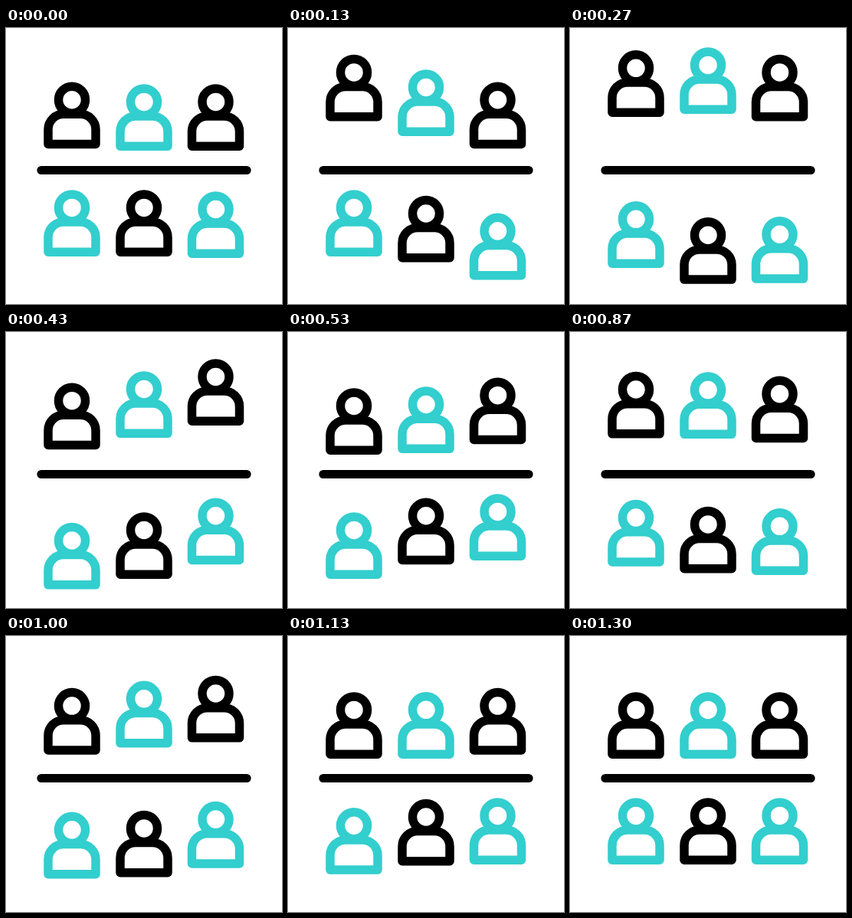
These frames come from a looping animation (360 px wide and 360 px high, 1.67 s). An HTML page:

```html
<!DOCTYPE html>
<html lang="en">
<head>
<meta charset="utf-8">
<title>Jumping groups</title>
<style>
  html, body { margin: 0; width: 100%; height: 100%; overflow: hidden; background: #fff; }
  svg { display: block; width: 100%; height: 100%; }
</style>
</head>
<body>
<svg id="stage" viewBox="0 0 360 360">
  <defs>
    <g id="person" fill="none" stroke-width="11.5" stroke-linecap="round" stroke-linejoin="round">
      <circle cy="23.4" r="17.5"/>
      <path d="M-31 81.2V62a20 20 0 0 1 20-20H11a20 20 0 0 1 20 20V81.2Z"/>
    </g>
  </defs>
  <path d="M46 185.5H314" stroke="#000" stroke-width="11.2" stroke-linecap="round"/>
</svg>
<script>
  const LOOP = 1670, FPS = 30;
  const BLACK = '#000', TEAL = '#33cece';
  const COLUMNS = [86, 180, 273.5];
  const stage = document.getElementById('stage');

  // dir: jump direction; lag: delay between neighbours, in ticks
  const rows = [
    { y: 73, dir: -1, high: 48, low: 22, lag: i => 2 * i, colors: [BLACK, TEAL, BLACK] },
    { y: 211, dir: 1, high: 38, low: 19.5, lag: i => 3 * (2 - i), colors: [TEAL, BLACK, TEAL] }
  ];

  const people = rows.flatMap(row => COLUMNS.map((x, i) => {
    const el = document.createElementNS('http://www.w3.org/2000/svg', 'use');
    el.setAttribute('href', '#person');
    el.setAttribute('stroke', row.colors[i]);
    stage.appendChild(el);
    return { el, x, row, lag: row.lag(i) };
  }));

  function ease(a, b, t) {
    const s = Math.min(1, Math.max(0, (t - a) / (b - a)));
    return s * s * (3 - 2 * s);
  }

  // Rise from a to b, fall from c to d
  const hop = (t, a, b, c, d) => ease(a, b, t) - ease(c, d, t);

  function draw(ms) {
    const tick = Math.floor((ms % LOOP + 5) * FPS / 1000);
    for (const { el, x, row, lag } of people) {
      const t = tick - lag;
      const lift = row.high * hop(t, -1, 6, 6.5, 15) + row.low * hop(t, 16, 25.3, 25.3, 32.2);
      el.setAttribute('transform', `translate(${x} ${row.y + row.dir * lift})`);
    }
  }

  const start = performance.now();
  function loop() {
    draw(performance.now() - start);
    requestAnimationFrame(loop);
  }
  loop();
</script>
</body>
</html>
```
